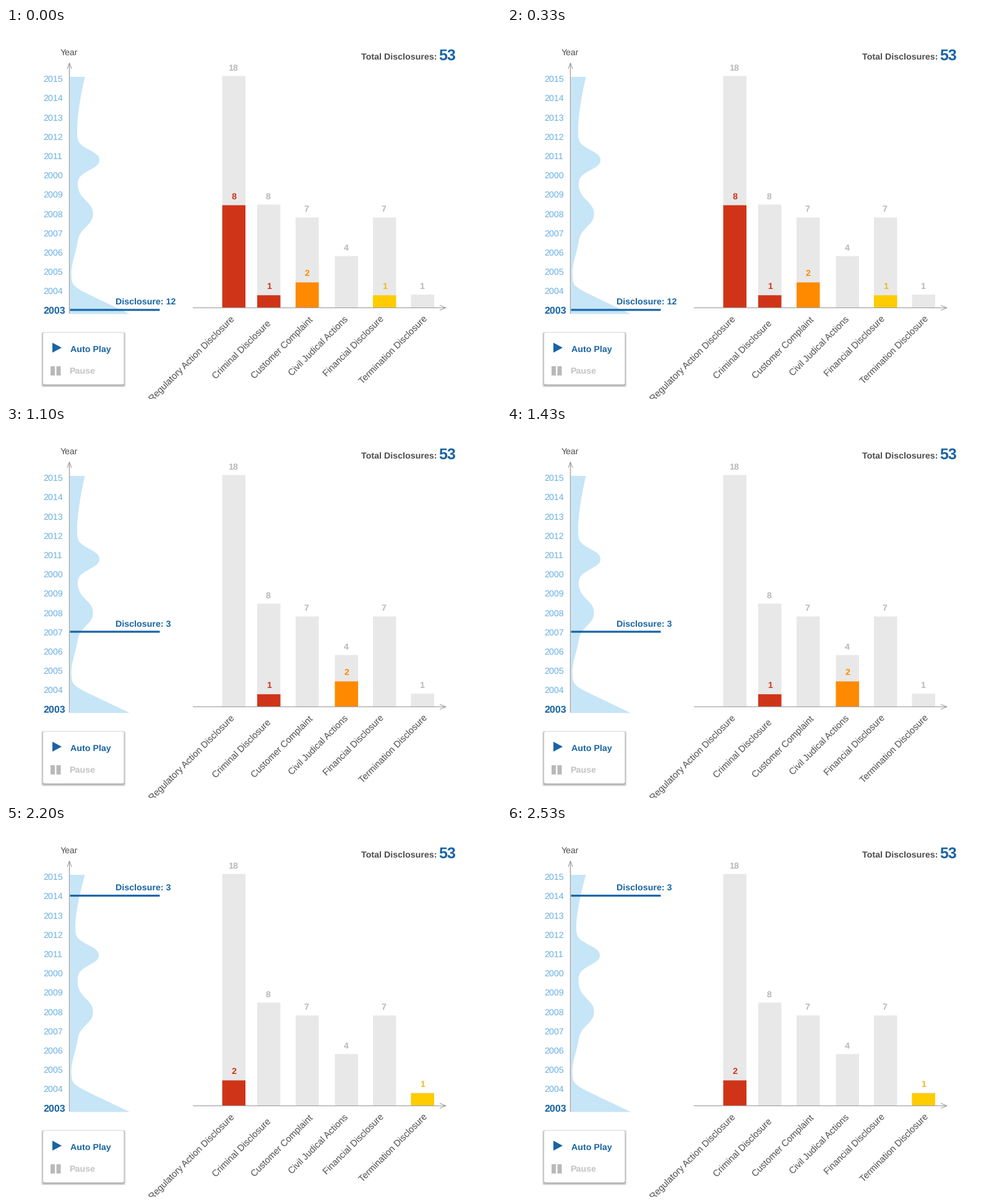
Write a matplotlib script that moves like this. It is 800 px wide and 600 px high and loops after 2750 ms.

```python
import matplotlib.pyplot as plt
import numpy as np
from matplotlib.animation import FuncAnimation
from matplotlib.patches import FancyBboxPatch, Polygon, Rectangle

plt.rcParams["font.family"] = "Liberation Sans"
plt.rcParams["text.hinting"] = "none"
plt.rcParams["path.snap"] = False

PT = 0.72  # points per pixel at 100 dpi
BLUE, SKY, PALE = "#1864a4", "#69b0e2", "#c6e5f7"
DARK, AXIS, MUTED = "#4c4c4c", "#a2a2a2", "#b9b9b9"
RED, ORANGE, YELLOW = "#cf3418", "#ff8a00", "#ffcc00"
BASE, UNIT, BAR_W = 452, 20.8, 37.5

fig = plt.figure(figsize=(8, 6), dpi=100, facecolor="white")
ax = fig.add_axes([0, 0, 1, 1])
ax.set_xlim(0, 800)
ax.set_ylim(600, 0)
ax.axis("off")


def label(x, y, text, color, size=14.3, bold=True, ha="left", **kw):
    return ax.text(x, y, text, color=color, fontsize=size * PT, ha=ha, va="baseline",
                   fontweight="bold" if bold else "normal", **kw)


def line(points, color, width, **kw):
    xs, ys = zip(*points)
    return ax.plot(xs, ys, color=color, lw=width * PT, solid_capstyle="butt", **kw)[0]


def box(x, y, w, h, color, **kw):
    return ax.add_patch(Rectangle((x, y), w, h, fc=color, lw=0, **kw))


def panel(grow, drop, color, alpha=1):
    ax.add_patch(FancyBboxPatch((60 - grow, 493 + drop - grow), 130.5 + 2 * grow, 83.5 + 2 * grow,
                                boxstyle="round,pad=0,rounding_size=2.5",
                                fc=color, alpha=alpha, lw=0))


def year_y(year):
    return 82 + 31.2 * (2015 - year)


def ease(y, start, end):
    t = np.clip((y - start) / (end - start), 0, 1)
    return t * t * (3 - 2 * t)


def bump(y, centre, height, width):
    return height * np.exp(-np.abs((y - centre) / width) ** 2.5)


def area(peak, low):
    """Yearly profile with its upper peak at `peak` and a waist `low` wide above it."""
    y = np.linspace(78.5, 462, 400)
    width = low + (12 - low) * ease(y, 170, 230) - 10 * ease(y, 340, 396)
    width += (24 - low) * np.clip((160 - y) / 81.5, 0, 1) ** 1.5
    width += bump(y, peak, 35.5, 20) + bump(y, 300, 25, 26)
    width += 8.4 * np.log1p(np.exp((y - 417) / 4))
    return ax.fill_betweenx(y, 103, 103 + width, color=PALE, lw=0, zorder=1)


early, late = area(213, 11.5), area(208, 8.5)

# Year axis
line([(102.5, 57), (102.5, 462)], AXIS, 1.4)
line([(99, 66), (102.5, 56.5), (106, 66)], AXIS, 1.1)
label(88, 44, "Year", DARK, 14, False)
for year in range(2004, 2016):
    # The axis shows 2000 in the place of 2010.
    label(60, year_y(year) + 5, str(2000 if year == 2010 else year), SKY, 14.3, False)
label(60, year_y(2003) + 5.5, "2003", BLUE, 16)

# Total
label(573.5, 51, "Total Disclosures:", DARK)
label(699.5, 51.3, "53", BLUE, 25)

# Control panel
for grow in np.linspace(3, 0, 5):
    panel(grow, 1.5, "black", 0.075)
panel(0, 0, "white")
ax.add_patch(Polygon([(75, 509), (75, 525), (90, 517)], fc=BLUE, lw=0))
label(104.5, 523.7, "Auto Play", BLUE)
for x in (72, 81.5):
    box(x, 547, 7, 15, MUTED)
label(102.5, 559, "Pause", "#c4c4c4")

# Bar left, total, name, lower right end of the name
CATEGORIES = [
    (349.5, 18, "Regulatory Action Disclosure", (370, 471.5)),
    (406, 8, "Criminal Disclosure", (430, 479)),
    (468, 7, "Customer Complaint", (496.5, 472.5)),
    (531.5, 4, "Civil Judical Actions", (554, 472.5)),
    (593, 7, "Financial Disclosure", (612, 471.5)),
    (654.5, 1, "Termination Disclosure", (682, 471.5)),
]


def text_y(n):
    return BASE - UNIT * n - 9.2


bars, values, totals = [], [], []
for i, (left, total, name, end) in enumerate(CATEGORIES):
    color = (RED, ORANGE, YELLOW)[i // 2]
    ink = "#efbb16" if color == YELLOW else color
    mid = left + BAR_W / 2
    box(left, BASE - UNIT * total, BAR_W, UNIT * total, "#e8e8e8")
    bars.append(box(left, BASE, BAR_W, 0, color, zorder=2))
    totals.append(label(mid - 1, text_y(total), str(total), MUTED, ha="center"))
    values.append(label(mid, 0, "", ink, ha="center"))
    label(*end, name, "#505050", 14.7, False, "right", rotation=45, rotation_mode="anchor")

line([(302, 452.5), (711, 452.5)], AXIS, 1.2, zorder=3)
line([(701, 448.5), (711, 452.5), (701, 456.5)], AXIS, 1.1, zorder=3)

slider = line([(103.5, 0), (248.5, 0)], BLUE, 3.2, zorder=4)
caption = label(177, 0, "", BLUE)

# Year and its disclosures in each category
STEPS = [
    (2003, (8, 1, 2, 0, 1, 0)),
    (2005, (0, 0, 0, 0, 0, 0)),
    (2007, (0, 1, 0, 2, 0, 0)),
    (2011, (2, 1, 1, 0, 2, 0)),
    (2014, (2, 0, 0, 0, 0, 1)),
]


def update(i):
    year, counts = STEPS[i]
    y = year_y(year) - 0.5
    early.set_visible(year < 2011)
    late.set_visible(year >= 2011)
    slider.set_ydata([y, y])
    caption.set_y(y - 8.6)
    caption.set_text(f"Disclosure: {sum(counts)}")
    for n, bar, value, total, category in zip(counts, bars, values, totals, CATEGORIES):
        bar.set_y(BASE + 1 - UNIT * n)
        bar.set_height(UNIT * n)
        value.set_text(str(n) if n else "")
        value.set_y(text_y(n))
        total.set_visible(n != category[1])
    return []


anim = FuncAnimation(fig, update, frames=len(STEPS), interval=550, repeat=True, repeat_delay=0)
plt.show()
```
